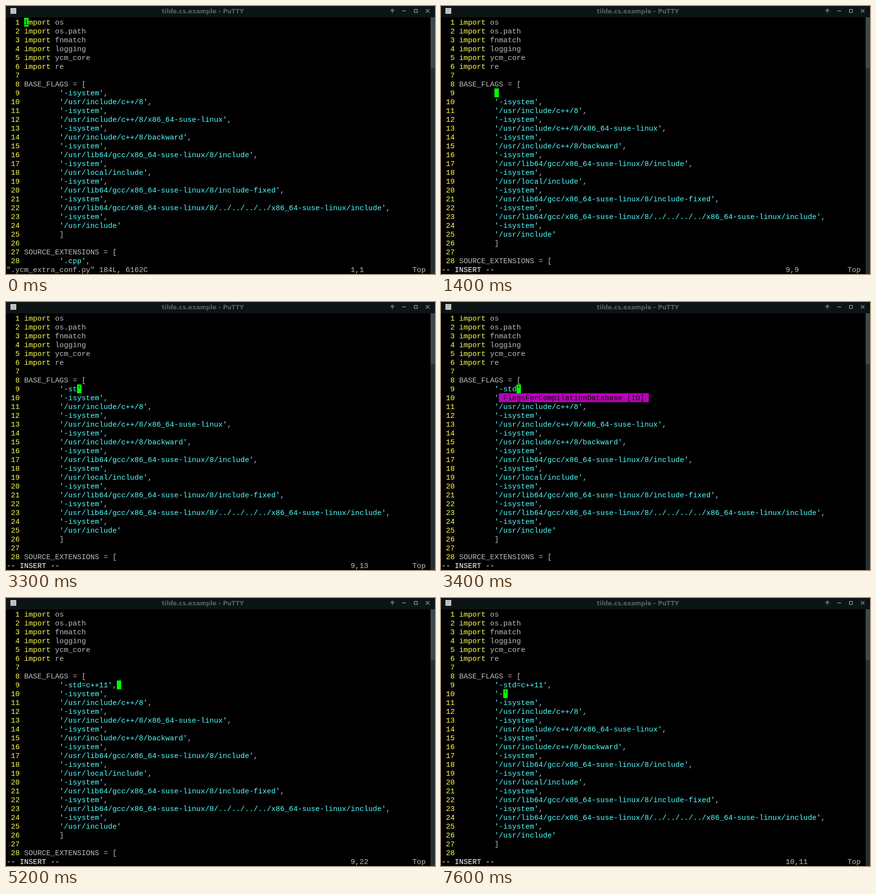
These frames come from a looping animation (875x546 px, 8 s). An HTML page:

```html
<!DOCTYPE html>
<html lang="en">
<head>
<meta charset="utf-8">
<title>Terminal editor</title>
<style>
html, body { margin: 0; width: 100%; height: 100%; overflow: hidden; background: #000; }
svg { display: block; }
.term { font: 15px "Liberation Mono", monospace; font-variant-ligatures: none; }
.term text { white-space: pre; }
.title { font: bold 12px "DejaVu Sans", sans-serif; fill: #566063; }
</style>
</head>
<body>
<svg width="875" height="546" viewBox="0 0 875 546">
  <rect width="875" height="546" fill="#000"/>
  <rect width="875" height="23" fill="#0d1415"/>
  <rect x="9" y="4" width="12" height="12" fill="#c0c0c0"/>
  <text class="title" x="401.5" y="15" text-anchor="middle">tilde.cs.example - PuTTY</text>
  <g fill="none" stroke="#667073" stroke-width="2">
    <path d="M788 14V7M784 10.5L788 6.5L792 10.5"/>
    <path d="M808 10H816"/>
    <rect x="833" y="7" width="6" height="6"/>
    <path d="M856.5 6.5L863.5 13.5M863.5 6.5L856.5 13.5"/>
  </g>
  <rect x="866" y="23" width="9" height="523" fill="#293133"/>
  <rect x="866" y="23" width="9" height="103" fill="#3f494c"/>
  <g class="term" id="screen"></g>
</svg>
<script>
const LOOP = 8000, CELL = 9, ROW = 18, LEFT = 1, TOP = 24, VISIBLE = 28, GUTTER = 4;
const GRAY = "#bbbbbb", YELLOW = "#ffff55", CYAN = "#55ffff", GREEN = "#00ff00", PURPLE = "#bb00bb";
const screen = document.getElementById("screen");
const indent = " ".repeat(8);

const includes = [
  "/usr/include/c++/8",
  "/usr/include/c++/8/x86_64-suse-linux",
  "/usr/include/c++/8/backward",
  "/usr/lib64/gcc/x86_64-suse-linux/8/include",
  "/usr/local/include",
  "/usr/lib64/gcc/x86_64-suse-linux/8/include-fixed",
  "/usr/lib64/gcc/x86_64-suse-linux/8/../../../../x86_64-suse-linux/include",
  "/usr/include"
];
const head = [
  ...["os", "os.path", "fnmatch", "logging", "ycm_core", "re"].map(name => "import " + name),
  "", "BASE_FLAGS = ["
];
const tail = [
  ...includes.flatMap((path, i) => [
    `${indent}'-isystem',`,
    `${indent}'${path}'${i < includes.length - 1 ? "," : ""}`
  ]),
  indent + "]", "", "SOURCE_EXTENSIONS = [", indent + "'.cpp',"
];

const moveTimes = [300, 400, 600, 700, 800, 1000, 1100];
const flag = "-std=c++11";
const flagTimes = [3100, 3200, 3300, 3400, 3500, 3600, 3700, 3800, 4000, 4300];
const passed = (times, t) => times.filter(time => time <= t).length;

// Cursor columns are counted from 1, as in the ruler.
function stateAt(t) {
  if (t < 1400) {
    const row = 1 + passed(moveTimes, t);
    return { added: [], row, col: 1, insert: false, ruler: row === 7 ? "7,0-1" : row + ",1" };
  }
  const typed = flag.slice(0, passed(flagTimes, t));
  let added, col;
  if (t < 5500) {
    added = [t < 2200 ? "" : `'${typed}'${t >= 5200 ? "," : ""}`];
    col = 9 + (t >= 2200) + typed.length + (t >= 4800) + (t >= 5200);
  } else {
    added = [`'${flag}',`, t < 6700 ? "" : t < 7600 ? "''" : "'-'"];
    col = 9 + (t >= 6700) + (t >= 7600);
  }
  const row = 8 + added.length;
  const popup = t >= 3400 && t < 3500;
  return { added, row, col, insert: true, popup, ruler: `${row},${col}` };
}

const escapeText = s => s.replace(/&/g, "&amp;").replace(/</g, "&lt;");
const put = (row, cell, s, fill) =>
  `<text x="${LEFT + cell * CELL}" y="${TOP + row * ROW + 14}" fill="${fill}">${escapeText(s)}</text>`;
const block = (row, cell, cells, fill) =>
  `<rect x="${LEFT + cell * CELL}" y="${TOP + row * ROW}" width="${cells * CELL}" height="${ROW}" fill="${fill}"/>`;

function codeLine(line, row) {
  let out = put(row, 0, String(row + 1).padStart(3), YELLOW);
  for (const m of line.matchAll(/'[^']*'|^import|[^\s']+/g)) {
    const fill = m[0][0] === "'" ? CYAN : m[0] === "import" ? YELLOW : GRAY;
    out += put(row, GUTTER + m.index, m[0], fill);
  }
  return out;
}

function draw(state) {
  const lines = [...head, ...state.added.map(s => indent + s), ...tail].slice(0, VISIBLE);
  const row = state.row - 1, col = state.col - 1;
  let out = lines.map(codeLine).join("");
  out += block(row, GUTTER + col, 1, GREEN) + put(row, GUTTER + col, lines[row][col] || "", "#000");
  if (state.popup) {
    const item = " FlagsForCompilationDatabase [ID] ";
    out += block(row + 1, 13, item.length, PURPLE) + put(row + 1, 14, item.trim(), "#000");
  } else {
    out += put(VISIBLE, 78, state.ruler, GRAY) + put(VISIBLE, 92, "Top", GRAY);
  }
  out += state.insert
    ? put(VISIBLE, 0, "-- INSERT --", "#ffffff")
    : put(VISIBLE, 0, '".ycm_extra_conf.py" 184L, 6162C', GRAY);
  screen.innerHTML = out;
}

let shown = "";
const start = performance.now();
function tick() {
  const state = stateAt((performance.now() - start) % LOOP);
  const key = JSON.stringify(state);
  if (key !== shown) {
    shown = key;
    draw(state);
  }
  requestAnimationFrame(tick);
}
tick();
</script>
</body>
</html>
```
